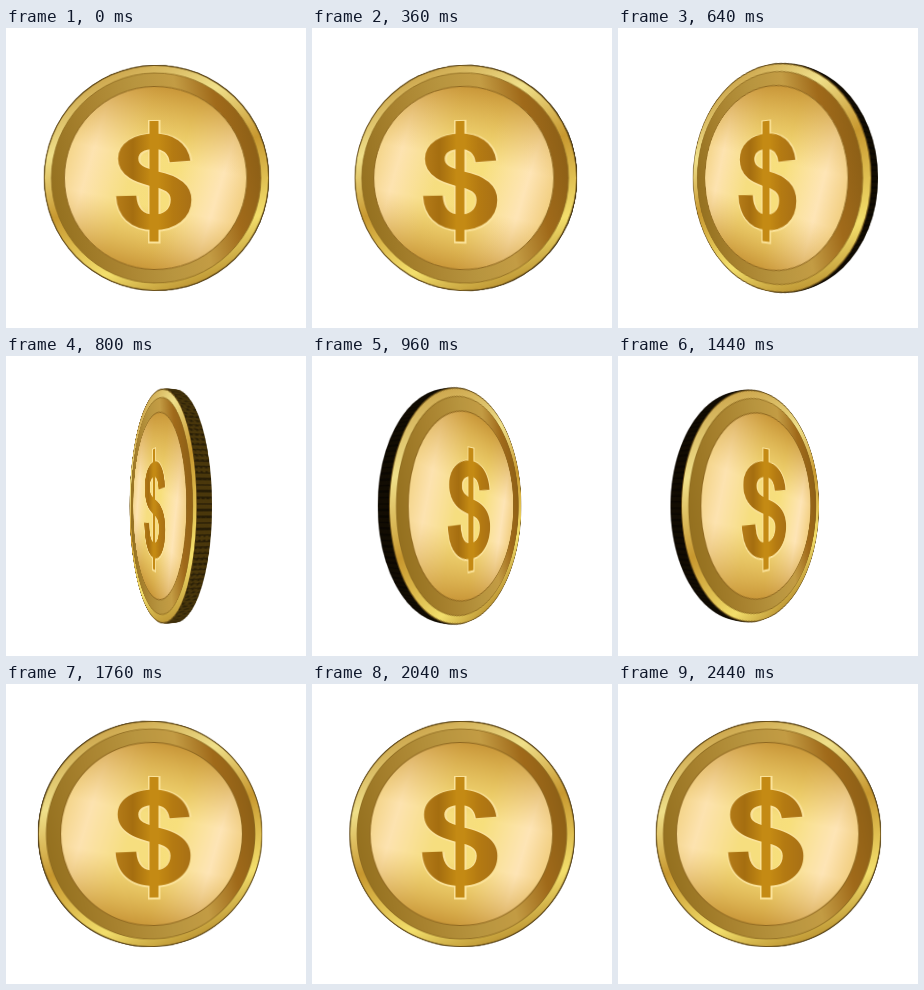
An HTML page without scripts that plays this animation: 300 px wide and 300 px high, repeating every 2.48 s.

```html
<!DOCTYPE html>
<html lang="en">
<head>
<meta charset="utf-8">
<title>Spinning coin</title>
<style>
  html, body { margin: 0; width: 100%; height: 100%; overflow: hidden; background: #fff; }
  .stage {
    position: relative; width: 300px; height: 300px; overflow: hidden;
    perspective: 400px; perspective-origin: 147.5px 150px;
  }
  .coin {
    position: absolute; left: 34.5px; top: 37px; width: 226px; height: 226px;
    transform-style: preserve-3d;
    animation: spin 2480ms infinite;
  }
  .coin > * { position: absolute; inset: 0; width: 226px; height: 226px; }
  .face { backface-visibility: hidden; }
  .back { transform: translateZ(-13px) rotateY(180deg); }
  .coin i {
    border-radius: 50%;
    background: repeating-conic-gradient(#0007 0 .8deg, #0000 .8deg 2.4deg) #120c02;
    transform: translateZ(calc(var(--z) * -1px));
    animation: glint 2480ms linear infinite;
  }
  /* Cubic ease in and out around one full turn, then a short rest */
  @keyframes spin {
    0% { transform: rotateY(-4.5deg); animation-timing-function: cubic-bezier(.333, 0, .667, 0); }
    44.35% { transform: rotateY(-184.5deg); animation-timing-function: cubic-bezier(.333, 1, .667, 1); }
    88.7%, 100% { transform: rotateY(-364.5deg); }
  }
  /* The rim lights up when the coin is seen edge-on */
  @keyframes glint {
    0%, 31%, 38%, 47%, 57%, 100% { background-color: #120c02; }
    33.5%, 35.5%, 50%, 54% { background-color: #7d5e14; }
  }
</style>
</head>
<body>
<div class="stage">
  <div class="coin">
    <svg class="face" viewBox="-113 -113 226 226">
      <defs>
        <linearGradient id="rim" x1=".3" y1="0" x2=".7" y2="1">
          <stop offset="0" stop-color="#c9a046"/>
          <stop offset=".25" stop-color="#f0e08a"/>
          <stop offset=".5" stop-color="#c8982f"/>
          <stop offset=".8" stop-color="#f3df6c"/>
          <stop offset="1" stop-color="#b58a2a"/>
        </linearGradient>
        <linearGradient id="groove" x1="0" y1=".6" x2="1" y2=".4">
          <stop offset="0" stop-color="#94701f"/>
          <stop offset=".25" stop-color="#a8822f"/>
          <stop offset=".5" stop-color="#b8953f"/>
          <stop offset=".68" stop-color="#c39c44"/>
          <stop offset=".85" stop-color="#a06a1a"/>
          <stop offset="1" stop-color="#8c5f16"/>
        </linearGradient>
        <linearGradient id="field" x1="0" y1=".35" x2="1" y2=".65">
          <stop offset="0" stop-color="#f3d384"/>
          <stop offset=".15" stop-color="#fde3b0"/>
          <stop offset=".38" stop-color="#f6de80"/>
          <stop offset=".6" stop-color="#f7df7c"/>
          <stop offset=".84" stop-color="#fee5b6"/>
          <stop offset="1" stop-color="#f0cb78"/>
        </linearGradient>
        <linearGradient id="shade" x1=".6" y1="0" x2=".4" y2="1">
          <stop offset="0" stop-color="#bf872a" stop-opacity=".85"/>
          <stop offset=".4" stop-color="#d9a83e" stop-opacity="0"/>
          <stop offset=".65" stop-color="#d9a83e" stop-opacity="0"/>
          <stop offset="1" stop-color="#bf872a" stop-opacity=".85"/>
        </linearGradient>
        <linearGradient id="ink" gradientUnits="userSpaceOnUse" x1="-38" y1="0" x2="38" y2="0">
          <stop offset="0" stop-color="#b57c18"/>
          <stop offset=".22" stop-color="#a56e10"/>
          <stop offset=".5" stop-color="#c98f14"/>
          <stop offset=".75" stop-color="#b47a12"/>
          <stop offset="1" stop-color="#a87016"/>
        </linearGradient>
        <!-- Squashed vertically so the curves are thinner at top and bottom -->
        <path id="curve" fill="none" transform="scale(1 .75)" d="M26-22C24-41 13-49 0-49C-15-49-26-40-26-26C-26-9-13-4 0 1C15 5 27 12 27 29C27 48 15 59 0 59C-17 59-27 47-28 24"/>
        <g id="design">
          <circle r="113" fill="#6e5218"/>
          <circle r="112" fill="url(#rim)"/>
          <circle r="105" fill="url(#groove)" stroke="#8d6a20" stroke-width=".8"/>
          <circle r="91.5" fill="url(#field)"/>
          <circle r="91.5" fill="url(#shade)" stroke="#8f6820"/>
          <g stroke="#fbe39a" fill="#fbe39a">
            <use href="#curve" x=".5" y=".5" stroke-width="24"/>
            <path d="M-6-58H6.500V65.500H-6Z" stroke="none"/>
          </g>
          <use href="#curve" stroke="url(#ink)" stroke-width="20.5"/>
          <path d="M-4.500-57H4.500V63.500H-4.500Z" fill="#c48a14"/>
        </g>
      </defs>
      <use href="#design"/>
    </svg>
    <i style="--z:1"></i><i style="--z:2"></i><i style="--z:3"></i><i style="--z:4"></i>
    <i style="--z:5"></i><i style="--z:6"></i><i style="--z:7"></i><i style="--z:8"></i>
    <i style="--z:9"></i><i style="--z:10"></i><i style="--z:11"></i><i style="--z:12"></i>
    <svg class="face back" viewBox="-113 -113 226 226"><use href="#design"/></svg>
  </div>
</div>
</body>
</html>
```
